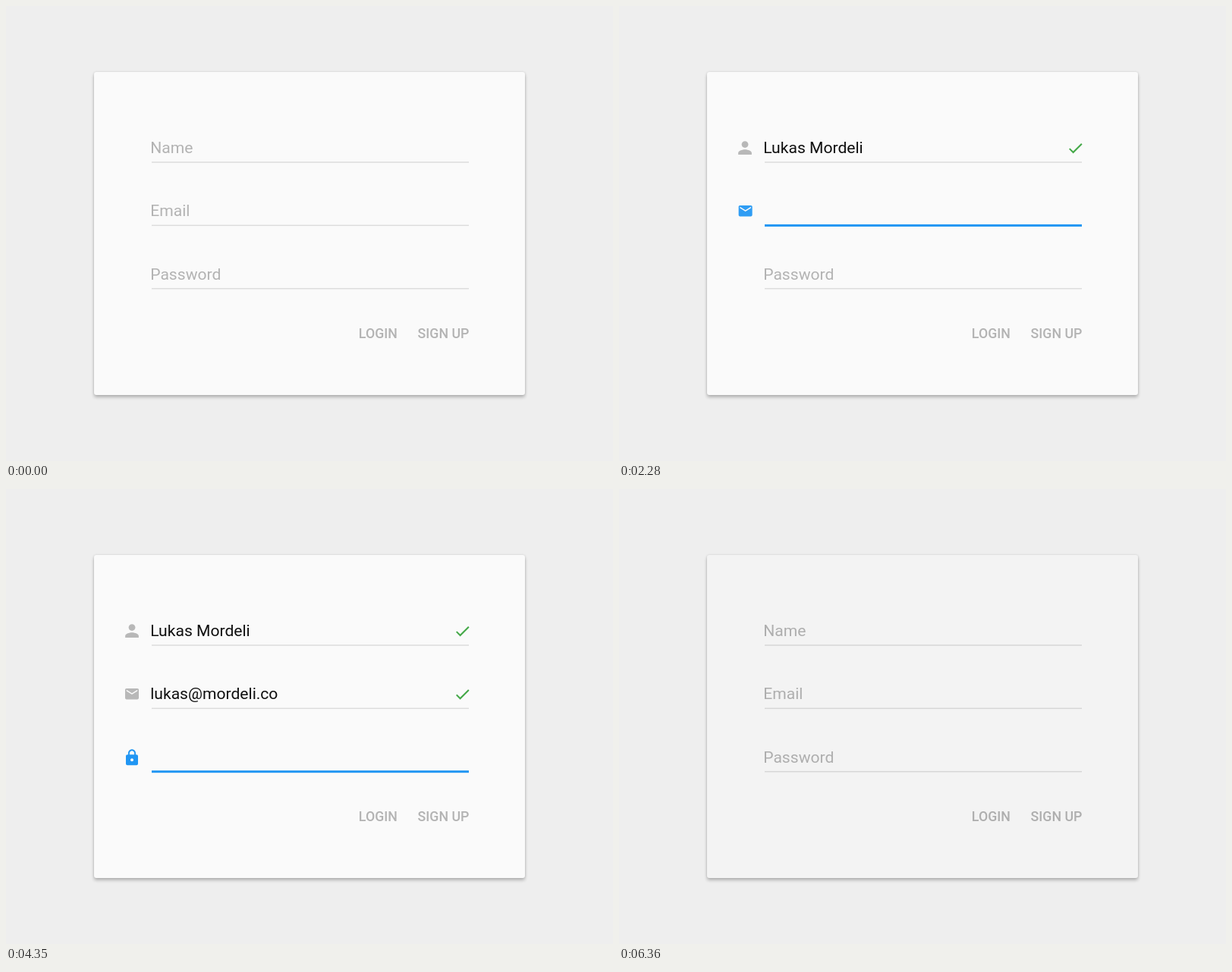
These frames come from a looping animation (800 by 600 pixels, 6540 ms). An HTML page:

```html
<!DOCTYPE html>
<html lang="en">
<head>
<meta charset="utf-8">
<title>Sign-up form</title>
<style>
  html, body { margin: 0; width: 100%; height: 100%; overflow: hidden; background: #eee; }
  #card {
    position: absolute; left: 116px; top: 87px; width: 568px; height: 426px;
    border-radius: 3px; background: #fafafa;
    box-shadow: 0 3px 4px rgba(0,0,0,.24), 0 0 3px rgba(0,0,0,.12);
  }
  svg { position: absolute; left: 0; top: 0; font-family: Roboto, sans-serif; }
  .field { font-size: 21.1px; }
  .button { font-size: 17.75px; font-weight: 500; text-anchor: end; }
</style>
</head>
<body>
<div id="card"></div>
<svg width="800" height="600" viewBox="0 0 800 600">
  <clipPath id="clip"><rect x="116" y="87" width="568" height="426" rx="3"/></clipPath>
  <g id="scene"></g>
</svg>
<script>
const LOOP = 6540, STEP = 30, TYPING = 450, SUBMIT = 5880;
const BLUE = '#2196f3', GREEN = '#43a847', GREY = '#b3b3b3', INK = '#101010';

const rows = [
  { label: 'Name', value: 'Lukas Mordeli', y: 0, start: 300, done: 1800,
    iconAt: [152.7, 173.7, 1.11],
    icon: 'M12 12c2.21 0 4-1.79 4-4s-1.79-4-4-4-4 1.79-4 4 1.79 4 4 4zm0 2c-2.67 0-8 1.34-8 4v2h16v-2c0-2.66-5.33-4-8-4z' },
  { label: 'Email', value: 'lukas@mordeli.co', y: 83.3, start: 2100, done: 3600,
    iconAt: [155.2, 259.4, 0.9],
    icon: 'M20 4H4c-1.1 0-2 .9-2 2v12c0 1.1.9 2 2 2h16c1.1 0 2-.9 2-2V6c0-1.1-.9-2-2-2zm0 4l-8 5-8-5V6l8 5 8-5v2z' },
  { label: 'Password', value: '********', secret: true, y: 166.6, start: 3900, done: 5310,
    iconAt: [154, 342.3, 1],
    icon: 'M18 8h-1V6c0-2.76-2.24-5-5-5S7 3.24 7 6v2H6c-1.1 0-2 .9-2 2v10c0 1.1.9 2 2 2h12c1.1 0 2-.9 2-2V10c0-1.1-.9-2-2-2zm-6 9c-1.1 0-2-.9-2-2s.9-2 2-2 2 .9 2 2-.9 2-2 2zm3.1-9H8.9V6c0-1.71 1.39-3.1 3.1-3.1s3.1 1.39 3.1 3.1v2z' }
];

const clamp = v => Math.min(1, Math.max(0, v));
const easeOut = (p, power) => 1 - (1 - clamp(p)) ** power;
const rect = (x, y, w, h, fill) =>
  `<rect x="${x}" y="${y}" width="${w}" height="${h}" fill="${fill}"/>`;
const text = (cls, x, y, fill, str, opacity = 1) =>
  `<text class="${cls}" x="${x}" y="${y}" fill="${fill}" opacity="${opacity}">${str}</text>`;

function typed(row, count) {
  const str = row.value.slice(0, count);
  if (!row.secret) return text('field', 190.2, 194, INK, str);
  return [...str].map((_, i) =>
    `<circle cx="${194.4 + 11.2 * i}" cy="185.9" r="2.5" fill="${INK}"/>`).join('');
}

function entry(row, t) {
  const age = t - row.start;
  if (age < 0) return '';
  const active = t < row.done;
  const [x, y, scale] = row.iconAt;
  const slide = 10 * (1 - easeOut(age / 300, 3));
  let out = `<path d="${row.icon}" fill="${active ? BLUE : '#b8b8b8'}" fill-rule="evenodd"
    opacity="${easeOut(age / 300, 3)}"
    transform="translate(${x + slide} ${y - row.y}) scale(${scale})"/>`;
  if (active) {
    const half = 209 * easeOut(age / 180, 3);
    out += rect(401 - half, 204.6, half * 2, 3, BLUE);
  }
  if (age >= 300 && age < 450) out += rect(192, 178, 2, 19, BLUE);
  if (age >= 600) {
    const share = clamp((age - 600) / TYPING);
    out += typed(row, Math.floor(row.value.length * share + 1e-6));
    out += active
      ? `<path d="M595.8 181.7l12 12m0-12l-12 12" stroke="#b0b0b0" stroke-width="1.7"/>`
      : `<path d="M9 16.17L4.83 12l-1.42 1.41L9 19 21 7l-1.41-1.41z" fill="${GREEN}" transform="translate(589.6 175.4)"/>`;
  }
  return out;
}

function ripple(age) {
  if (age < 0) return '';
  const r = 576 * easeOut((age + 1) / 306, 2);
  const alpha = 0.125 * (1 - Math.min(age, 480) / 620);
  return `<g clip-path="url(#clip)"><circle cx="577" cy="432" r="${r}" opacity="${alpha}"/></g>`;
}

function draw(t) {
  const reset = clamp((t - SUBMIT) / 150);
  let out = '';
  for (const row of rows) {
    const hint = Math.max(reset, 1 - clamp((t - row.start) / 150));
    out += `<g transform="translate(0 ${row.y})">`
      + rect(192, 205.3, 418, 1.5, '#dcdcdc')
      + text('field', 190.2, 194, GREY, row.label, hint)
      + `<g opacity="${1 - reset}">${entry(row, t)}</g></g>`;
  }
  out += text('button', 515.9, 438, GREY, 'LOGIN') + text('button', 610.4, 438, GREY, 'SIGN UP');
  if (t >= 4950) out += text('button', 610.4, 438, BLUE, 'SIGN UP', 1 - reset);
  return out + ripple(t - SUBMIT);
}

const scene = document.getElementById('scene');
const begin = performance.now();
function frame() {
  const t = (performance.now() - begin) % LOOP;
  scene.innerHTML = draw(Math.floor(t / STEP) * STEP);
  requestAnimationFrame(frame);
}
frame();
</script>
</body>
</html>
```
